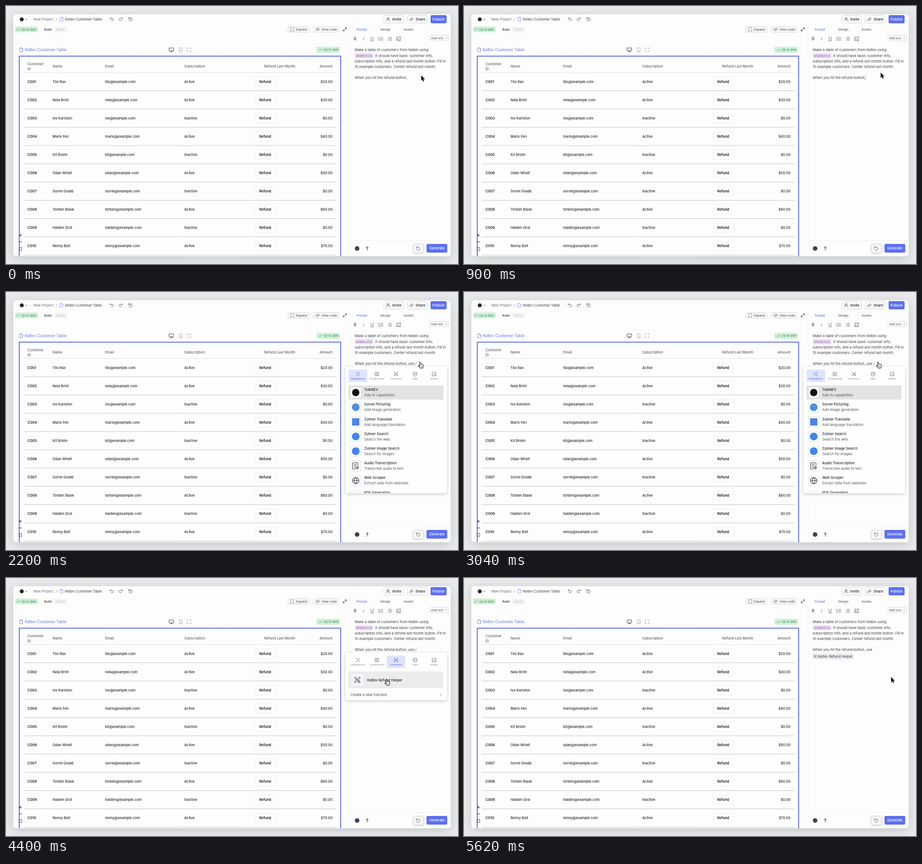
Write an HTML page with a canvas that moves like this. It is 990 by 566 pixels and loops after 5640 ms.

```html
<!DOCTYPE html>
<html lang="en">
<head>
<meta charset="utf-8">
<title>Prompt editor</title>
<style>
html, body { margin: 0; width: 990px; height: 566px; overflow: hidden; background: #eaebec; }
canvas { display: block; width: 990px; height: 566px; }
</style>
</head>
<body>
<canvas id="stage"></canvas>
<script>
const W = 990, H = 566, LOOP = 5640;
const cv = document.getElementById('stage');
const dpr = window.devicePixelRatio || 1;
cv.width = W * dpr;
cv.height = H * dpr;
const c = cv.getContext('2d');

const INK = '#26272b', GREY = '#565a63', BLUE = '#5c6ff2', VIOLET = '#6673e2';
const BRAND = 'Kelbiv', HELPER = BRAND + ' Refund Helper', DOC = BRAND + ' Customer Table';

const rows = [
  ['Tilo Rax', 20], ['Nela Brint', 30], ['Ivo Karlston', 0], ['Maris Fen', 40], ['Kit Brolm', 0],
  ['Odan Whelt', 50], ['Sorrel Gradd', 0], ['Torben Blask', 60], ['Halden Grut', 0], ['Renny Bolt', 70]
];
const tabs = ['Integrations', 'Components', 'Functions', 'Data', 'Assets'];
const addons = [
  ['TolkNEV', 'Add AI capabilities'],
  ['Sorvel Picturing', 'Add image generation'],
  ['Zulmer Translate', 'Add language translation'],
  ['Zulmer Search', 'Search the web'],
  ['Zulmer Image Search', 'Search for images'],
  ['Audio Transcription', 'Transcribe audio to text'],
  ['Web Scraper', 'Extract data from websites'],
  ['PDF Generation', '']
];

// y is the middle of the capitals
function text(s, x, y, size = 7.65, color = INK, weight = 400, align = 'left') {
  c.font = `${weight} ${size}px Inter, Arial, sans-serif`;
  c.textAlign = align;
  c.fillStyle = color;
  c.fillText(s, x, y + size * 0.364);
  return c.measureText(s).width;
}

function box(x, y, w, h, r, fill, stroke, lw = 1) {
  c.beginPath();
  c.roundRect(x, y, w, h, r);
  if (fill) { c.fillStyle = fill; c.fill(); }
  if (stroke) { c.strokeStyle = stroke; c.lineWidth = lw; c.stroke(); }
}

function shadowed(color, blur, dy, draw) {
  c.save();
  c.shadowColor = color;
  c.shadowBlur = blur * dpr;
  c.shadowOffsetY = dy * dpr;
  draw();
  c.restore();
}

// strokes an SVG path placed at x, y
function icon(x, y, d, color = GREY, lw = 0.9, fill) {
  c.save();
  c.translate(x, y);
  c.lineWidth = lw;
  c.lineCap = c.lineJoin = 'round';
  c.strokeStyle = color;
  const p = new Path2D(d);
  if (fill) { c.fillStyle = fill; c.fill(p); }
  c.stroke(p);
  c.restore();
}

function dot(x, y, r, color) {
  c.beginPath();
  c.arc(x, y, r, 0, 7);
  c.fillStyle = color;
  c.fill();
}

function rule(x1, y1, x2, y2, color, lw = 1) {
  c.beginPath();
  c.moveTo(x1, y1);
  c.lineTo(x2, y2);
  c.strokeStyle = color;
  c.lineWidth = lw;
  c.stroke();
}

const CHECK = 'M-2.4 .2 L-.7 2 L2.5 -1.8';
const FILE = 'M-3 -4.2 H.8 L3.2 -1.8 V4.2 H-3 Z M.8 -4.2 V-1.8 H3.2';
const CORNERS = 'M-3.5 -1.2V-3.5H-1.2 M1.2 -3.5H3.5V-1.2 M3.5 1.2V3.5H1.2 M-1.2 3.5H-3.5V1.2';
const UNDO = 'M-1.8 -3.8 L-3.8 -1.8 L-1.8 .2 M-3.8 -1.8 H1.5 A2.4 2.4 0 0 1 1.5 3 H-1.5';
const REDO = 'M1.8 -3.8 L3.8 -1.8 L1.8 .2 M3.8 -1.8 H-1.5 A2.4 2.4 0 0 0 -1.5 3 H1.5';
const RESET = 'M-3.4 -1.8 A3.9 3.9 0 1 1 -3.9 .8 M-4 -4 V-1.5 H-1.5';
const DOWN = 'M-1.7 -.8 L0 .9 L1.7 -.8';
const PICTURE = 'M-4 -4 H4 V4 H-4 Z M-4 2.5 L-1 -.2 L3 4 M1 1.8 L2.2 .8 L4 2.3 M1.2 -1.6 h.9';
const FUNC = 'M-4 -2 V-4 H-2 M2 -4 H4 V-2 M4 2 V4 H2 M-2 4 H-4 V2 M-2.2 -2 h2 v2 h-2 Z M.6 .6 h2 v2 h-2 Z M1 -1.4 h2 M-3 1.6 h2';
const tabIcons = [
  'M-3 -3 L3 3 M3 -3 L-3 3 M-4 -3.5 h1.6 v1.2 M4 -3.5 h-1.6 v1.2 M-4 3.5 h1.6 v-1.2 M4 3.5 h-1.6 v-1.2',
  'M-4 -4 h3 v3 h-3 Z M1 -4 h3 v3 h-3 Z M-4 1 h3 v3 h-3 Z M1 1 h3 v3 h-3 Z',
  FUNC,
  'M-4 -3 a4 1.4 0 1 1 8 0 a4 1.4 0 1 1 -8 0 V3 a4 1.4 0 0 0 8 0 V-3 M-4 0 a4 1.4 0 0 0 8 0',
  PICTURE
];
const AUDIO = 'M5 -1 V-5 Q5 -7 3 -7 H-5 Q-7 -7 -7 -5 V5 Q-7 7 -5 7 H-1 M-4 -3.5 H2 M-4 -.5 H0 M-4 2.5 H-2 M0 2.5 h1.6 L4 .6 V7 L1.6 5 H0 Z M6 2 Q7.3 3.8 6 5.6';
const GLOBE = 'M-7 0 A7 7 0 1 1 7 0 A7 7 0 1 1 -7 0 H7 M0 -7 Q-6 0 0 7 Q6 0 0 -7';

function backdrop() {
  c.fillStyle = '#eaebec';
  c.fillRect(0, 0, W, H);
  shadowed('rgba(40,44,52,.2)', 24, 5, () => box(16, 18, 958, 531, 7, '#fdfdfd'));
}

function topBar() {
  dot(34.5, 29.3, 4.3, '#24252a');
  icon(44.5, 29.3, DOWN, INK);
  text('New Project', 60, 29.2, 7.65, '#6b6e76');
  text('/', 109, 29.2, 7.65, '#777');
  icon(121.5, 29, FILE, '#7a86e8', 0.8);
  text(DOC, 129, 29.2, 7.65, '#3c3f47');
  icon(231.5, 29, UNDO);
  icon(251.5, 29, REDO);
  icon(272.5, 29, RESET + ' M0 -2 V.3 L1.6 1.2');

  for (const [x, label, tx] of [[827, 'Invite', 846], [878, 'Share', 897]]) {
    box(x + .5, 20.5, 43.5, 17, 3, '#fafafa', '#d6d7da');
    text(label, tx, 29.2, 7.65, INK, 500);
  }
  icon(837, 29, 'M-4 3.5 Q-4 .6 -1 .6 Q2 .6 2 3.5 M-2.6 -2 a1.6 1.6 0 1 1 3.2 0 a1.6 1.6 0 1 1 -3.2 0 M2 -3.5 a1.6 1.6 0 0 1 0 3 M3 1 Q4.3 1.8 4.3 3.5');
  icon(888, 29, 'M1 -3.5 L4 -.5 L1 2.5 V.8 Q-2.5 .6 -4 3.5 Q-3.5 -1.6 1 -1.8 Z');
  box(930, 20, 35, 18, 3, BLUE);
  text('Publish', 947.5, 29.2, 7.65, '#fff', 500, 'center');
}

function upToDate(x, y, w, h, tx) {
  box(x, y, w, h, 2, '#cdf0d6');
  icon(tx - 7, y + h / 2, CHECK, '#3b8f5a');
  text('Up to date', tx, y + h / 2, 6.7, '#3b8557');
}

function toolBar() {
  upToDate(20, 45, 49.5, 12.5, 33);
  box(79.5, 45.5, 54, 12, 2, '#f3f3f4');
  box(80, 46, 25, 11, 2, '#fff');
  text('Build', 84, 51.3, 6.7, INK, 500);
  text('Demo', 110.5, 51.3, 6.7, '#c2c3c6');

  box(617.5, 45.5, 46, 12, 2, '#f8f8f8', '#d3d4d6');
  icon(627, 51.3, CORNERS, GREY, 0.8);
  text('Expand', 635, 51.3, 6.8, '#3c3f47');
  box(673.5, 45.5, 55, 12, 2, '#f8f8f8', '#d3d4d6');
  icon(682.5, 51.3, 'M-2 -2.2 L-4.2 0 L-2 2.2 M2 -2.2 L4.2 0 L2 2.2 M.9 -3 L-.9 3', INK, 0.8);
  text('View code', 691, 51.3, 6.8, '#3c3f47');
  icon(742, 51.3, 'M-3.4 3.4 L3.4 -3.4 M.6 -3.4 H3.4 V-.6 M-3.4 .6 V3.4 H-.6', INK);
}

function canvasArea() {
  c.fillStyle = '#f0f0f1';
  for (let y = 66; y < 548; y += 8.6)
    for (let x = 20; x < 752; x += 8.6) c.fillRect(x, y, 1, 1);

  icon(33.5, 96, FILE, VIOLET, 0.9);
  text(DOC, 41, 96, 8.65, VIOLET);
  icon(362.3, 96, 'M-4.7 -4 H4.7 V2.3 H-4.7 Z M0 2.3 V4.4 M-2.3 4.4 H2.3', '#333');
  icon(383, 96, 'M-2.8 -4.3 H2.8 V4.3 H-2.8 Z M-.8 2.8 H.8', '#a0a2a8', 0.9);
  icon(401, 96, 'M-4 -1.8V-4H-1.8 M1.8 -4H4V-1.8 M4 1.8V4H1.8 M-1.8 4H-4V1.8', '#8b8e95', 0.9);
  upToDate(680, 89.5, 51, 13, 695.5);
}

function table() {
  box(29, 110, 704, 460, 0, '#fdfdfd', VIOLET, 2);
  const head = '#5d6370';
  text('Customer', 47, 127.5, 7.55, head, 500);
  text('ID', 47, 138, 7.55, head, 500);
  text('Name', 102, 132.7, 7.55, head, 500);
  text('Email', 217, 132.7, 7.55, head, 500);
  text('Subscription', 390.5, 132.7, 7.55, head, 500);
  text('Refund Last Month', 599.5, 132.7, 7.55, head, 500, 'center');
  text('Amount', 715, 132.7, 7.55, head, 500, 'right');
  rule(39, 145.8, 724, 145.8, '#dedfe1');

  rows.forEach(([name, amount], i) => {
    const y = 165.8 + i * 40.09;
    const user = name.split(' ')[0].toLowerCase();
    text('C' + String(i + 1).padStart(3, '0'), 47, y, 7.7, INK, 600);
    text(name, 102, y, 7.55, INK, 500);
    text(user + '@example.com', 217, y, 7.55, INK, 500);
    text(amount ? 'Active' : 'Inactive', 390.5, y, 7.55, INK, 500);
    box(546, y - 10.3, 44, 20.6, 3, '#fefefe', '#efeff0');
    text('Refund', 567.7, y, 7.5, '#18191c', 600, 'center');
    text('$' + amount.toFixed(2), 715, y, 7.55, INK, 500, 'right');
    rule(39, y + 20, 724, y + 20, '#c1c2c4');
  });

  icon(31.3, 503, 'M-3 0 H3 M0 -3 V3', '#222', 1);
  icon(31.3, 517.6, 'M-3 0 H3', '#222', 1);
  icon(31.5, 533, 'M-3 -1V-3H-1 M1 -3H3V-1 M3 1V3H1 M-1 3H-3V1', '#222', 1);
}

function sidePanel() {
  c.fillStyle = '#fdfdfd';
  c.fillRect(753, 41, 221, 501);
  rule(753.5, 42, 753.5, 549, '#f1f1f2');
  text('Prompt', 779.5, 51.3, 6.7, BLUE, 500, 'center');
  text('Design', 831, 51.3, 6.7, '#3c3f47', 400, 'center');
  text('Assets', 881.7, 51.3, 6.7, '#3c3f47', 400, 'center');

  text('B', 764.5, 72, 9.5, GREY, 500, 'center');
  icon(783.3, 72, 'M.5 -1 L-.6 3.2 M1.2 -3.4 v.1', GREY);
  icon(802, 72, 'M-2.6 -4 V-.6 A2.6 2.6 0 0 0 2.6 -.6 V-4 M-3.3 4.3 H3.3', GREY);
  const lines = 'M-1.5 -3 H4.5 M-1.5 0 H4.5 M-1.5 3 H4.5';
  icon(821, 72, lines + ' M-4.3 -4 V-1 M-4.8 1 h1.4 l-1.4 2.4 h1.4', GREY, 0.8);
  icon(840, 72, lines + ' M-4.3 -3 h.2 M-4.3 0 h.2 M-4.3 3 h.2', GREY, 0.9);
  icon(860, 72, 'M0 -4 H-4 V4 H4 V0 M-4 2.5 L-1 -.2 L3 4 M3 -4.7 V-1.3 M1.3 -3 H4.7', GREY);
  box(928.5, 64.5, 41, 11.5, 2, '#fdfdfd', '#d6d7da');
  text('Add-ons', 931, 70.3, 6.5, '#44474f');
  icon(964.5, 70.3, DOWN, GREY, 0.8);

  rule(754, 514.5, 974, 514.5, '#f0f0f1');
  dot(769, 532, 5, '#3d4063');
  text('?', 791, 532, 11, '#33363d', 600, 'center');
  shadowed('rgba(0,0,0,.16)', 4, 1, () => box(892.5, 522.5, 22, 19, 3, '#fafafa', '#dcdde0'));
  icon(903, 532, RESET);
  box(921, 522, 45.5, 19, 3, BLUE);
  text('Generate', 943.8, 531.7, 7.65, '#fff', 500, 'center');
}

const T = { type: 1080, slash: 1950, menu: 2080, funcs: 3660, pick: 4580, caretOff: 5200 };

function typed(t) {
  const base = 'When you hit the refund button,';
  if (t >= T.pick) return base + ' use';
  if (t >= T.slash) return base + ' use /';
  return base + ' use '.slice(0, Math.max(0, Math.floor((t - T.type) / 90) + 1));
}

function prompt(t) {
  const x = 763.7, ink = '#3b3e46';
  text(`Make a table of customers from ${BRAND} using`, x, 96.5, 7.7, ink);
  box(764, 103, 40, 12, 2, '#eee2f5');
  text('shadcn/ui', 766, 109, 7.7, '#9a58b4');
  text('. It should have basic customer info,', 804.3, 109, 7.7, ink);
  text('subscription info, and a refund last month button. Fill in', x, 121.5, 7.7, ink);
  text('10 example customers. Center refund last month.', x, 133.5, 7.7, ink);
  const w = text(typed(t), x, 156.7, 7.7, ink);
  if (t > 900 && t < T.menu) rule(x + w + .5, 151.5, x + w + .5, 161, '#888', 0.8);

  if (t >= T.pick) {
    box(764, 165, 90, 14, 2, '#eeeef1');
    c.save();
    c.translate(769, 171.8);
    c.scale(.75, .75);
    icon(0, 0, FUNC, '#666', 0.8);
    c.restore();
    text(HELPER, 775, 171.8, 7.7, ink);
    if (t < T.caretOff) rule(853.6, 164, 853.6, 180, '#333', 1);
  }
}

function addonMark(i, y) {
  const x = 766;
  box(x - 11.5, y - 11.5, 23, 23, 2, '#fff', '#dedfe2');
  if (i === 0) dot(x, y, 8, '#111');
  else if (i === 1) dot(x, y, 8.5, '#4f8fdc');
  else if (i === 2) box(x - 8, y - 8, 16, 16, 1, '#4b85e8');
  else if (i < 5) dot(x, y, 8.5, '#4285f4');
  else if (i === 5) icon(x, y, AUDIO, '#333', 1.1);
  else if (i === 6) icon(x, y, GLOBE, '#30343f', 1.1);
  else box(x - 6, y - 8, 12, 16, 2, '#e6e6e8');
}

function menu(t) {
  if (t < T.menu || t >= T.pick) return;
  const funcs = t >= T.funcs, active = funcs ? 2 : 0, h = funcs ? 104.5 : 278;
  shadowed('rgba(0,0,0,.2)', 7, 2, () => box(743.5, 163.5, 222.5, h, 3, '#fefefe'));
  c.save();
  c.beginPath();
  c.rect(743, 163, 223, h);
  c.clip();
  tabs.forEach((label, i) => {
    const x = 770.6 + i * 41.8, on = i === active;
    if (on) box(x - 20.5, 170, 41, 27.5, 2, '#e0e4fc');
    icon(x, 180, tabIcons[i], on ? BLUE : '#777a82', 0.8);
    text(label, x, 190.3, 5.4, on ? BLUE : '#85888f', on ? 500 : 400, 'center');
  });
  if (funcs) {
    if (t > 4200) box(750, 205, 208, 37, 2, '#ececee');
    box(754.5, 208.5, 30, 30, 3, '#f3f4f6', '#dcdde0');
    c.save();
    c.translate(769.5, 223.5);
    c.scale(1.4, 1.4);
    icon(0, 0, FUNC, '#44474f', 0.8);
    c.restore();
    text(HELPER, 791, 223.8, 7.65, INK, 500);
    text('Create a new function', 754.7, 255.7, 7.7, '#44474f');
    icon(952.5, 255.5, 'M-1.2 -2.4 L1.2 0 L-1.2 2.4', '#777');
  } else {
    box(750, 205, 208, 31, 1, '#e3e3e4');
    addons.forEach(([name, note], i) => {
      const y = 220.5 + i * 32.2;
      addonMark(i, i === 7 ? y + 2 : y);
      text(name, 784.5, y - 6, 7.6, INK, 500);
      text(note, 784.5, y + 5.8, 7.7, '#55585f');
    });
  }
  c.restore();
}

// time, x, y of the pointer tip
const path = [
  [0, 909.5, 152.5], [420, 916.5, 142], [720, 916.5, 142], [1150, 906.5, 153.5], [3120, 906.5, 153.5],
  [3540, 857, 187.5], [3950, 857, 187.5], [4320, 833, 222], [4640, 833, 222], [5220, 935.5, 217.5], [LOOP, 935.5, 217.5]
];

function pointer(t) {
  let i = 0;
  while (i < path.length - 2 && t >= path[i + 1][0]) i++;
  const [t0, x0, y0] = path[i], [t1, x1, y1] = path[i + 1];
  const u = Math.min(1, Math.max(0, (t - t0) / (t1 - t0)));
  const e = u * u * (3 - 2 * u);
  return [x0 + (x1 - x0) * e, y0 + (y1 - y0) * e];
}

const ARROW = 'M0 0 V11 L2.5 8.8 L4.3 13 L6.2 12.2 L4.4 8.1 L7.8 7.9 Z';
const HAND = 'M-1 .8 Q0 -.7 1 .8 L2 4.6 Q3.2 3.7 4 5 Q5.2 4.3 5.9 5.6 Q7.1 5.2 7.5 6.6 L7.8 9.5 Q7.6 11.3 6.6 12.3 L6.4 13.4 L1.4 13.8 Q-.8 11.4 -3.2 8.6 Q-3.1 7 -1.4 7.7 L.4 9 Z';

function cursor(t) {
  const hand = t >= 1000 && t < 4720;
  const [xa, ya] = pointer(t - 14), [xb, yb] = pointer(t + 14);
  const n = Math.hypot(xb - xa, yb - ya) > 4 ? 5 : 1;
  c.save();
  c.globalAlpha = n > 1 ? 0.36 : 1;
  for (let i = 0; i < n; i++) {
    const [x, y] = n > 1 ? pointer(t + (i - 2) * 7) : pointer(t);
    if (hand) {
      icon(x, y, HAND, '#1d1d1f', 1.1, '#fff');
      icon(x, y, 'M3 9 V11.3 M4.8 9 V11.3', '#1d1d1f', 0.7);
    } else {
      icon(x, y, ARROW, '#fff', 1.4, '#111');
      icon(x, y, ARROW, '#111', 0.3, '#111');
    }
  }
  c.restore();
}

function frame() {
  const t = performance.now() % LOOP;
  c.setTransform(dpr, 0, 0, dpr, 0, 0);
  backdrop();
  c.save();
  c.beginPath();
  c.roundRect(16, 18, 958, 531, 7);
  c.clip();
  canvasArea();
  topBar();
  toolBar();
  table();
  sidePanel();
  prompt(t);
  menu(t);
  cursor(t);
  c.restore();
  requestAnimationFrame(frame);
}
requestAnimationFrame(frame);
</script>
</body>
</html>
```
